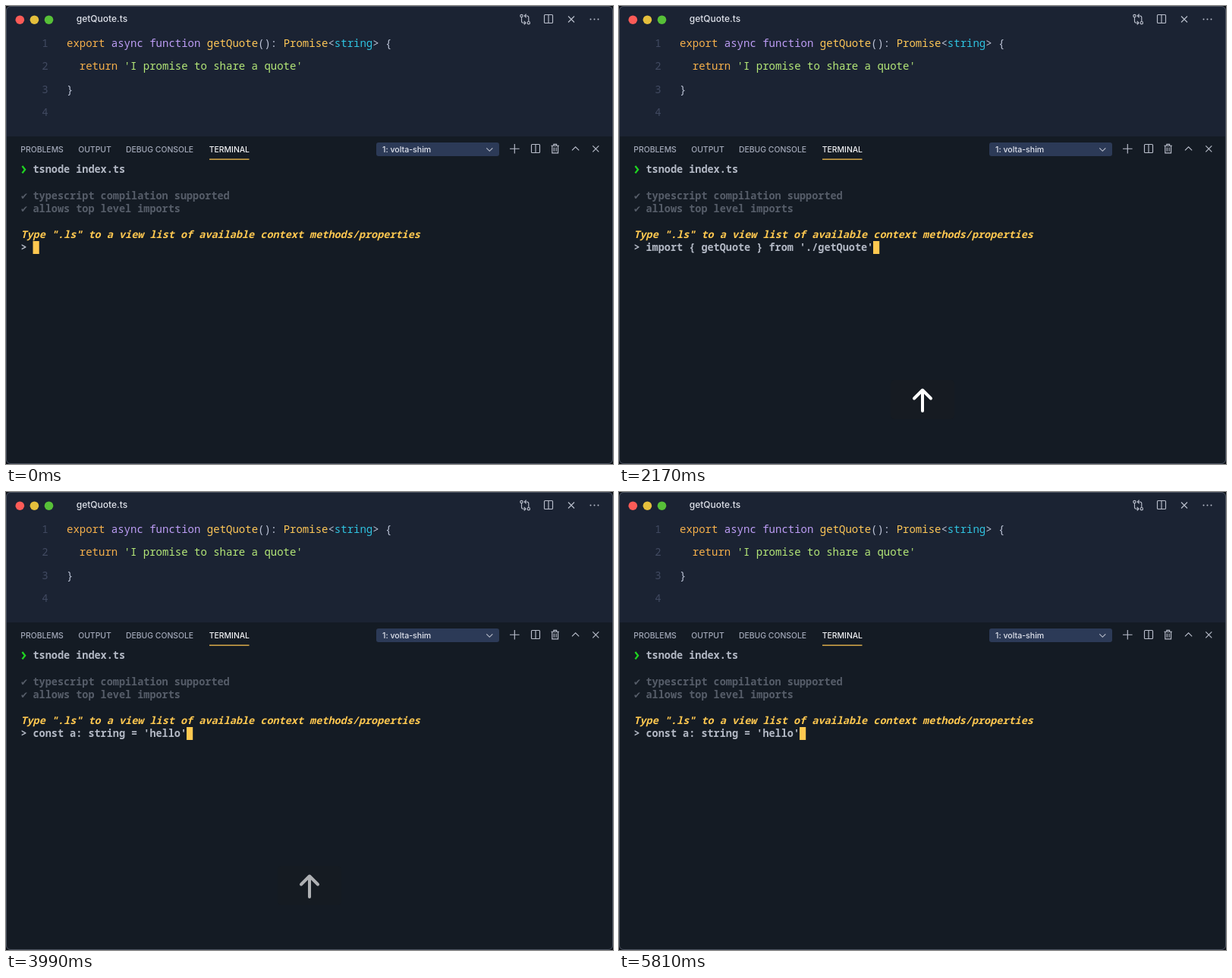
Animation of 800x604 px, one loop 5880 ms. Source, as an HTML page:

```html
<!DOCTYPE html>
<html lang="en">
<head>
<meta charset="utf-8">
<title>Terminal history</title>
<style>
  html, body { margin: 0; width: 100%; height: 100%; overflow: hidden; background: #0c1016; }
  svg { display: block; width: 800px; height: 604px; }
  text { white-space: pre; }

  .ui { font: 500 10.4px Inter, "Liberation Sans", sans-serif; fill: #a3a9b9; }
  .ui .title { font-size: 12px; fill: #dfe2ea; }
  .ui .active { fill: #f1f2f5; }
  .ui .choice { font-size: 10.6px; fill: #e2e5ee; }

  .code { font: 500 14px "Noto Sans Mono", "DejaVu Sans Mono", monospace; fill: #bcc3d6; }
  .num { fill: #414a61; }
  .key { fill: #f6b04b; }
  .mod { fill: #bd9df5; }
  .name { fill: #ffc757; }
  .type { fill: #2fc3e0; }
  .str { fill: #b5e878; }

  .term { font: 600 13.5px "Noto Sans Mono", "DejaVu Sans Mono", monospace; fill: #b3b9c5; }
  .dim { fill: #565d69; }
  .tick { font: 12px "DejaVu Sans", sans-serif; }
  .hint { font-style: italic; fill: #ffc850; }
  .caret { fill: #ffc850; }

  .icons { fill: none; stroke: #b9becb; stroke-width: 1.15; }

  /* Each recalled command replaces the line at once. */
  .entry { opacity: 0; animation: 5.88s step-end infinite; }
  .empty { animation-name: empty; }
  .call { animation-name: call; }
  .load { animation-name: load; }
  .decl { animation-name: decl; }
  .press { opacity: 0; animation: press 5.88s linear infinite; }

  @keyframes empty { 0% { opacity: 1; } 20.238%, 100% { opacity: 0; } }
  @keyframes call { 0% { opacity: 0; } 20.238% { opacity: 1; } 33.333%, 100% { opacity: 0; } }
  @keyframes load { 0% { opacity: 0; } 33.333% { opacity: 1; } 47.619%, 100% { opacity: 0; } }
  @keyframes decl { 0% { opacity: 0; } 47.619%, 100% { opacity: 1; } }
  @keyframes press {
    0%, 20.237% { opacity: 0; }
    20.238%, 66.667% { opacity: 1; }
    70.238%, 100% { opacity: 0; }
  }
</style>
</head>
<body>
<svg viewBox="0 0 800 604">
  <defs>
    <clipPath id="window"><rect width="800" height="604" rx="6"/></clipPath>
    <g id="split"><rect x="-5.5" y="-5.5" width="11" height="11" rx="1"/><path d="M0-5.5v11"/></g>
    <path id="cross" d="M-4-4l8 8m0-8l-8 8"/>
  </defs>

  <g clip-path="url(#window)">
    <rect width="800" height="604" fill="#1b2333"/>
    <rect y="172" width="800" height="432" fill="#141b24"/>
  </g>
  <rect x=".5" y=".5" width="799" height="603" rx="5.5" fill="none" stroke="#4b525f"/>

  <circle cx="18.3" cy="18.2" r="5.8" fill="#fc5b57"/>
  <circle cx="37.4" cy="18.2" r="5.8" fill="#e5bf3c"/>
  <circle cx="56.5" cy="18.2" r="5.8" fill="#57c038"/>

  <g class="ui">
    <text class="title" x="92.8" y="21">getQuote.ts</text>
    <text x="19.3" y="193">PROBLEMS</text>
    <text x="95.2" y="193">OUTPUT</text>
    <text x="158" y="193">DEBUG CONSOLE</text>
    <text class="active" x="267.8" y="193">TERMINAL</text>
    <rect x="268" y="201.5" width="52.5" height="1.3" fill="#f5c04f"/>
    <rect x="488" y="180" width="162" height="18" rx="3" fill="#2c3a57"/>
    <text class="choice" x="496" y="193">1: volta-shim</text>
  </g>

  <g class="icons">
    <g transform="translate(684 17.5)">
      <circle cx="-4.5" cy="-4.5" r="1.7"/>
      <circle cx="4.8" cy="4.7" r="1.7"/>
      <path d="M-4.5-2.8V2.5q0 2.2 2.2 2.2H1M-1.3 2.3L1 4.7-1.3 7M4.8 3V-2.3q0-2.2-2.2-2.2H-.7M1.6-6.9L-.7-4.5 1.6-2.1"/>
    </g>
    <use href="#split" x="715" y="17"/>
    <use href="#cross" x="745" y="17.5"/>
    <g fill="#b9becb" stroke="none">
      <circle cx="770.5" cy="17.5" r="1"/><circle cx="775.5" cy="17.5" r="1"/><circle cx="780.5" cy="17.5" r="1"/>
    </g>
    <path d="M633.3 187.3l4 4 4-4"/>
    <path d="M670.3 182v12.4M664 188.2h12.6"/>
    <use href="#split" x="698" y="188"/>
    <path d="M718.5 184.2h10.4M721.8 184v-1.7h3.8v1.7M719.8 184.5v9.3h7.8v-9.3M722.3 186.5v5.3M725.1 186.5v5.3"/>
    <path d="M746 190.4l4.6-4.6 4.6 4.6"/>
    <use href="#cross" x="777.3" y="188.3"/>
  </g>

  <g class="code">
    <g class="num">
      <text x="47.3" y="53.5">1</text>
      <text x="47.3" y="84">2</text>
      <text x="47.3" y="114.5">3</text>
      <text x="47.3" y="145">4</text>
    </g>
    <text x="80" y="53.5"><tspan class="key">export</tspan> <tspan class="mod">async function</tspan> <tspan class="name">getQuote</tspan>(): <tspan class="name">Promise</tspan>&lt;<tspan class="type">string</tspan>&gt; {</text>
    <text x="96.8" y="84"><tspan class="key">return</tspan> <tspan class="str">'I promise to share a quote'</tspan></text>
    <text x="80" y="114.5">}</text>
  </g>

  <g class="term">
    <path d="M21.4 211l3.7 4.7-3.7 4.7" fill="none" stroke="#1fd321" stroke-width="2.3"/>
    <text x="35.5" y="220.3">tsnode index.ts</text>
    <g class="dim">
      <text class="tick" x="19" y="254.5">✔</text>
      <text x="35.5" y="254.5">typescript compilation supported</text>
      <text class="tick" x="19" y="271.5">✔</text>
      <text x="35.5" y="271.5">allows top level imports</text>
    </g>
    <text class="hint" x="19.4" y="305.5">Type ".ls" to a view list of available context methods/properties</text>
    <text x="19.4" y="322.5">&gt;</text>

    <g class="entry empty">
      <rect class="caret" x="35.5" y="310" width="8.2" height="17"/>
    </g>
    <g class="entry call">
      <text x="35.5" y="322.5">await getQuote()</text>
      <rect class="caret" x="165" y="310" width="8.2" height="17"/>
    </g>
    <g class="entry load">
      <text x="35.5" y="322.5">import { getQuote } from './getQuote'</text>
      <rect class="caret" x="335" y="310" width="8.2" height="17"/>
    </g>
    <g class="entry decl">
      <text x="35.5" y="322.5">const a: string = 'hello'</text>
      <rect class="caret" x="238" y="310" width="8.2" height="17"/>
    </g>
  </g>

  <g class="press">
    <rect x="358" y="493" width="84" height="52" rx="5" fill="#161b22"/>
    <path d="M400 534V507M389 517.5l11-11 11 11" fill="none" stroke="#fff" stroke-width="4" stroke-linecap="round" stroke-linejoin="round"/>
  </g>
</svg>
</body>
</html>
```
